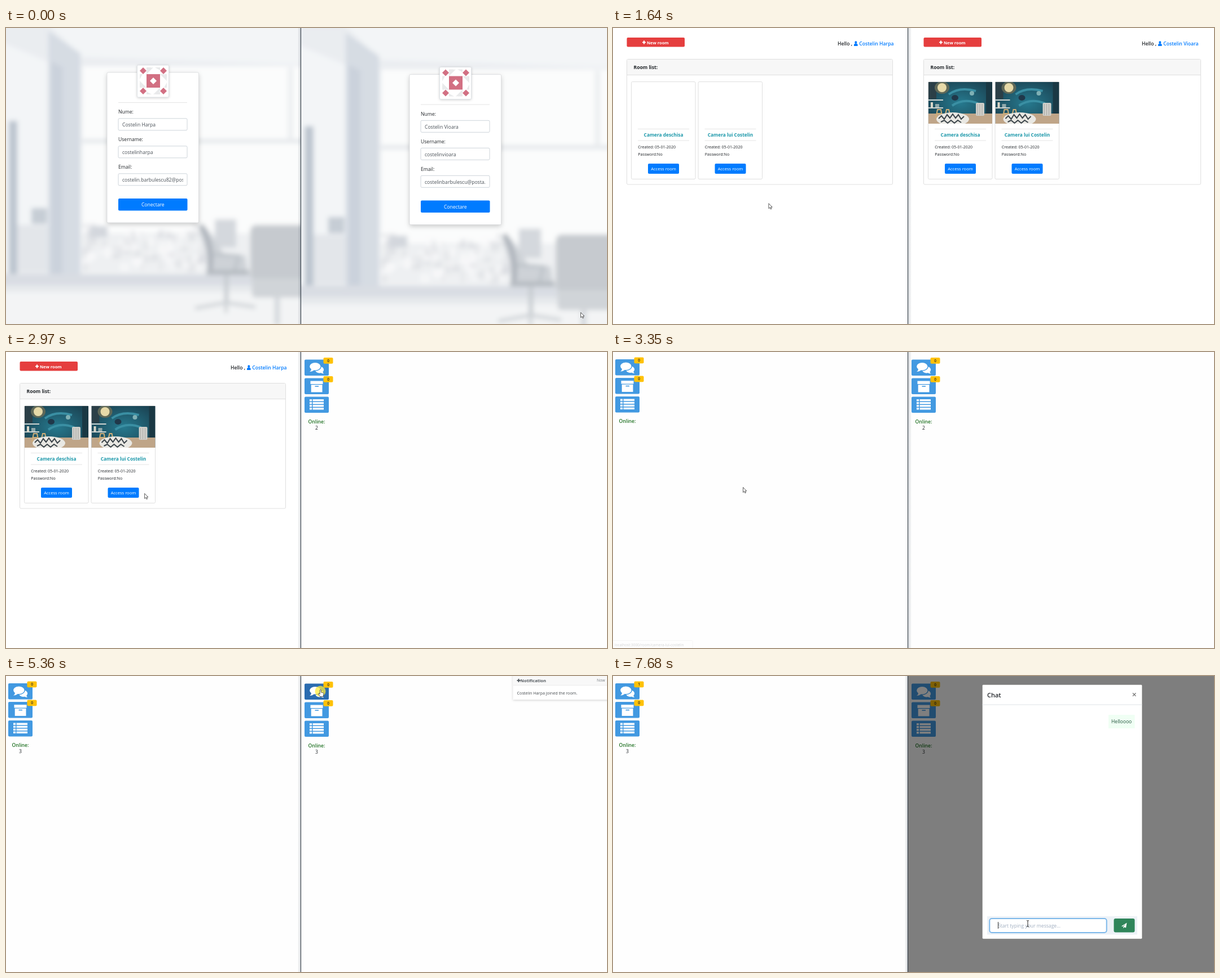
Animation of 1065 by 526 pixels, one loop 8000 ms. Source, as an HTML page:

```html
<!DOCTYPE html>
<html lang="ro">
<head>
<meta charset="utf-8">
<title>Chat rooms</title>
<style>
html, body { margin: 0; height: 100%; overflow: hidden; background: #fff; }
#stage { display: block; width: 100vw; height: 100vh; }
text { font: 8.6px "Open Sans", "Noto Sans", sans-serif; fill: #212529; }
.semi { font-weight: 600; }
.bold { font-weight: 700; }
.mid { text-anchor: middle; }
.end { text-anchor: end; }
.shadow { filter: drop-shadow(0 3px 4px rgba(0,0,0,.2)); }
.soft { filter: drop-shadow(0 1px 2px rgba(0,0,0,.18)); }
</style>
</head>
<body>
<svg id="stage" viewBox="0 0 1065 526"></svg>
<script>
const BLUE = '#007bff', LINE = '#dfdfdf';
const stage = document.getElementById('stage');
const $ = id => document.getElementById(id);

const rect = (x, y, w, h, fill, more = '') =>
  `<rect x="${x}" y="${y}" width="${w}" height="${h}" fill="${fill}" ${more}/>`;
const box = (x, y, w, h, fill, stroke = LINE) => rect(x, y, w, h, fill, `rx="2" stroke="${stroke}"`);
const path = (d, fill, more = '') => `<path d="${d}" fill="${fill}" ${more}/>`;
const stroke = (d, color, width = 1) => path(d, 'none', `stroke="${color}" stroke-width="${width}"`);
const ellipse = (x, y, rx, ry, fill, more = '') =>
  `<ellipse cx="${x}" cy="${y}" rx="${rx}" ry="${ry}" fill="${fill}" ${more}/>`;
const text = (x, y, s, { cls = '', size = 8.6, fill = '#212529', id = '' } = {}) =>
  `<text x="${x}" y="${y}" class="${cls}" id="${id}" style="font-size:${size}px;fill:${fill}">${s}</text>`;
const group = (id, body, more = '') => `<g id="${id}" ${more}>${body}</g>`;
const move = (x, y, body) => `<g transform="translate(${x} ${y})">${body}</g>`;
const plus = (x, y, fill) => stroke(`M${x - 3} ${y}h6M${x} ${y - 3}v6`, fill, 2);

function skyline() {
  let seed = 7, out = '';
  const rnd = () => (seed = (seed * 16807) % 2147483647) / 2147483647;
  for (let i = 0; i < 90; i++) {
    const x = 135 + rnd() * 215, y = 348 + rnd() * 70;
    out += rect(x, y, 4 + rnd() * 12, 5 + rnd() * 16, rnd() < .5 ? '#dadde1' : '#fafbfc', 'opacity=".6"');
  }
  return out;
}

// Blurred office interior behind the login form
const office = () => `<g filter="url(#blur)">` +
  rect(-20, -20, 580, 580, 'url(#haze)') +
  path('M-20 -20H560V66L135 52L60 -20z', '#f3f5f7') +
  path('M-20 20L75 60V435H-20z', '#f3f5f7') +
  rect(135, 68, 400, 370, '#fbfcfc') +
  rect(20, 350, 55, 85, '#e3e6ea') +
  rect(5, 165, 15, 285, '#bcc5cf') +
  path('M75 5L132 45V440L75 458z', '#d6dce3') + path('M80 60L100 70V450L80 456z', '#cbd2dc') +
  rect(135, 198, 400, 6, '#e0e4e8') + rect(500, 70, 8, 130, '#eaedef') +
  rect(135, 365, 400, 70, '#eef0f2') + skyline() +
  rect(45, 320, 28, 28, '#c6cdd5') + rect(150, 352, 30, 20, '#d3d7dd') + rect(370, 340, 38, 50, '#d4d8dd') +
  rect(-20, 437, 580, 20, '#d9dde3') + rect(-20, 457, 580, 12, '#e6e9ec') + rect(-20, 469, 580, 80, '#f3f4f5') +
  path('M340 350L356 356L385 400L424 404L428 436H358L354 400z', '#ced2d7') +
  stroke('M345 350Q368 385 361 430', '#aeb4bb', 9) + stroke('M366 402L412 405L405 432', '#bcc2c8', 5) +
  rect(355, 430, 76, 9, '#b6bbc1') + rect(387, 438, 7, 54, '#c5cacf') +
  stroke('M335 498L390 488L442 496M390 488V506', '#cfd3d7', 6) +
  rect(433, 350, 110, 97, '#c6cacf', 'rx="10"') + rect(436, 445, 104, 34, '#d0d4d8', 'rx="6"') +
  rect(476, 478, 9, 50, '#d3d7db') + '</g>';

function avatar() {
  let out = '';
  for (const a of [0, 90, 180, 270])
    out += `<g transform="rotate(${a} 261 94)">` + path('M243 70l6 6l-6 6l-6 -6z', '#d27083') +
      path('M249 70h9l-9 5zM273 70h-9l9 5zM249 82v-6q6 -6 12 -6z', '#e9eaeb') + '</g>';
  return box(232.5, 66, 56, 57, '#fff', '#dee2e6') + out + rect(249, 82, 24, 24, '#d27083') +
    path('M261 88l6 6l-6 6l-6 -6z', '#fff');
}

const login = (...values) =>
  rect(179, 79, 162.5, 267, '#fff', 'rx="2" class="shadow"') +
  rect(179, 79, 162.5, 267, 'none', 'rx="2" stroke="#d4d6d9" stroke-width=".7"') +
  `<g class="soft">${avatar()}</g>` + stroke('M199 132.5H321', '#e5e5e5') +
  ['Nume:', 'Username:', 'Email:'].map((label, i) => move(0, 49 * i,
    text(199, 152, label) + box(199, 160.8, 122, 21, '#fff', '#ced4da') +
    `<svg x="206" y="162" width="108" height="19">${text(0, 13, values[i], { fill: '#495057' })}</svg>`)).join('') +
  rect(199, 303, 122.5, 21.5, BLUE, 'rx="2"') +
  text(260.3, 317, 'Conectare', { cls: 'mid', fill: '#fff' });

// Flat stand-in for the playroom photo, 113 x 74
const photo = () => '<svg x="9" y="96" width="113" height="74">' +
  rect(0, 0, 113, 74, 'url(#space)') + '<g filter="url(#smooth)">' +
  stroke('M36 22Q55 8 84 16M42 42Q62 28 88 38', '#3a8fa3', 4) +
  rect(0, 0, 14, 30, '#2b3f47') + ellipse(24, 10, 13, 11, '#5f6858') + ellipse(24, 10, 8, 8, '#e6d9a8') +
  ellipse(47, 28, 6, 5, '#20384a') + ellipse(77, 20, 4, 4, '#7fb0b4') +
  rect(102, 0, 11, 56, '#1a3844') +
  rect(0, 56, 113, 18, '#bfa588') + rect(0, 31, 26, 2, '#cfd4d1') + rect(0, 45, 26, 2, '#cfd4d1') +
  rect(4, 36, 4, 9, '#d9d6c8') + rect(12, 39, 7, 6, '#8fa8ab') +
  stroke('M13 64L16 49H22L25 64M29 62L32 49H36L39 62M14 56H24', '#cfae78', 2) +
  rect(84, 37, 15, 23, '#d0cfca', 'rx="2"') + stroke('M87 39V59M91 39V59M95 39V59', '#a9a9a4') +
  ellipse(43, 66, 29, 12, '#e9e8e3') +
  stroke('M18 65l5 -5l5 6l5 -8l5 6l5 -7l5 7l5 -6l5 8l5 -5M22 71l6 -3l6 5l6 -5l6 5l6 -5l6 4', '#3b444a', 2) +
  '</g></svg>';

const roomCard = (x, title, id) => move(x, 0,
  box(8.5, 95.5, 113.5, 173, '#fff') + `<g class="${id}-photo">${photo()}</g>` +
  stroke('M20 179.5h91M20 200h91', '#e5e5e5') +
  text(65.5, 193.3, title, { cls: 'bold mid', size: 8.3, fill: '#1c98aa' }) +
  text(20.3, 213.5, 'Created: 05-01-2020', { size: 7.1 }) + text(20.3, 227, 'Password:No', { size: 7.1 }) +
  rect(38, 241, 55, 18, BLUE, `rx="2" class="${id}-access"`) +
  text(65.5, 253.3, 'Access room', { cls: 'mid', size: 7.6, fill: '#fff' }));

const roomList = (x, width, hello, name, id) => rect(0, 0, 1065, 526, '#fff') + move(x, 0,
  rect(.5, 17, 102.5, 16.5, '#e53e3e', 'rx="2"') + plus(31, 25.5, '#fff') +
  text(36, 28.5, 'New room', { cls: 'bold', size: 7.5, fill: '#fff' }) +
  box(.5, 55.5, width, 222.5, '#fff') + rect(1, 56, width - 1, 27, '#f7f7f7') +
  stroke(`M0 83.5h${width}`, LINE) + text(12.5, 73.2, 'Room list:', { cls: 'bold' }) +
  roomCard(0, 'Camera deschisa', id) + roomCard(118.5, 'Camera lui Costelin', id)) +
  move(hello, 0, text(0, 31, 'Hello ,', { cls: 'semi' }) + ellipse(32.3, 25.6, 2, 2.3, BLUE) +
    path('M29 32v-2q0 -2.5 3.3 -2.5t3.3 2.5v2z', BLUE) +
    text(38.3, 31, name, { cls: 'semi', fill: BLUE }));

const badge = (y, id) => rect(37.5, y, 17, 10.7, '#ffc107', 'rx="2"') +
  text(46, y + 7.8, '0', { cls: 'mid semi', size: 6.5, id });
const bubble = 'stroke="currentColor" stroke-width="1.3"';

const room = id => rect(0, 0, 600, 526, '#fefefe') +
  group(id + 'Chat', rect(4, 13, 43, 28.5, 'currentColor', 'rx="2"') +
    ellipse(30.5, 31, 7.6, 6, '#fff') + path('M32 36q3 2 6 2q-2 -2 -2 -5z', '#fff') +
    ellipse(22.8, 25.3, 10.3, 7.4, '#fff', bubble) + path('M16 29q0 4 -3 5.5q5 0 8 -3z', '#fff')) +
  rect(4, 46, 43, 28.5, '#4299e1', 'rx="2"') + rect(14.5, 51, 22, 5.5, '#fff') +
  rect(15.7, 57.7, 19.8, 13.2, '#fff') + stroke('M22.5 60.5h6.5', '#4299e1', 1.6) +
  rect(4, 79, 43, 28.5, '#4299e1', 'rx="2"') +
  [0, 1, 2, 3].map(i => stroke(`M13 ${85.3 + 5 * i}h4M18.5 ${85.3 + 5 * i}h19.5`, '#fff', 3.4)).join('') +
  badge(9.5, id + 'Unread') + badge(42.5, id + 'Files') +
  text(25.5, 126, 'Online:', { cls: 'mid semi', fill: '#1d7020' }) +
  text(25.5, 137, '', { cls: 'mid', id: id + 'Online' });

const toast = rect(898.5, -4, 170, 46, '#fff', 'class="soft"') + rect(898.5, -4, 170, 20, '#f8f8f8') +
  stroke('M898.5 16.5H1065', '#ececec') + plus(908.5, 8, '#555b60') +
  text(911.5, 11, 'Notification', { cls: 'bold', size: 7.6, fill: '#555b60' }) +
  text(1061.5, 10.3, 'Now', { cls: 'end', size: 6.8, fill: '#7c8287' }) +
  text(905.5, 32.7, 'Costelin Harpa joined the room.', { size: 7.2, fill: '#43484c' });

const modal = rect(654.3, 15.3, 283.5, 452, '#fff', 'rx="2" stroke="#6c6c6a" stroke-width=".6"') +
  text(663, 37.6, 'Chat', { cls: 'semi', size: 11 }) + stroke('M654.5 51H937.5', '#dee2e6') +
  stroke('M921 30.3l5.5 5.5m0 -5.5l-5.5 5.5', '#777', 1.3) +
  rect(663, 427, 266, 32.5, '#edf2f7') +
  rect(667.3, 431, 207.4, 25, '#fff', 'rx="4"') +
  group('focus', rect(667.3, 431, 207.4, 25, 'none', 'rx="4" stroke="#7db8ea" stroke-width="2"')) +
  text(682, 446.7, '', { id: 'draft' }) + rect(682, 437, 1, 12, '#333', 'id="caret"') +
  rect(887.5, 431, 37, 24.5, '#2f855a', 'rx="3"') +
  path('M901 444.5L910.5 438.5L909 447.5L906 446.3L904.3 448.5V445.6L908.5 440.5L903 445.2z', '#fff') +
  group('message', rect(878, 69, 46.5, 24, '#f0fff4') + text(883, 84.3, 'Helloooo', { fill: '#22543d' }));

const ink = 'stroke="#333" stroke-width=".8"';
const cursor = ellipse(0, 3, 9.5, 9.5, '#ffeb3b', 'opacity=".75" id="click"') +
  group('arrow', path('M.5 .5V9.5L2.6 7.6L4 10.7L5.5 10L4.1 7H6.8z', '#fff', ink)) +
  group('hand', path('M-.8 1Q.3 -.4 1.4 1V5L5 5.8Q6 6.2 6 7.5L5 12.5H-.5L-3.5 8Q-3.2 6.5 -1.8 7.5L-.8 8.3z', '#fff', ink)) +
  group('beam', stroke('M-2 -5.5Q0 -5.5 0 -4.5Q0 -5.5 2 -5.5M0 -4.5V4.5M-2 5.5Q0 5.5 0 4.5Q0 5.5 2 5.5', '#222'));

stage.innerHTML = `<defs>
  <filter id="blur" x="-5%" y="-5%" width="110%" height="110%"><feGaussianBlur stdDeviation="4.2"/></filter>
  <filter id="smooth"><feGaussianBlur stdDeviation=".6"/></filter>
  <linearGradient id="haze" x2="0" y2="1"><stop stop-color="#e9ecf0"/><stop offset="1" stop-color="#f3f4f5"/></linearGradient>
  <radialGradient id="space" r=".6"><stop stop-color="#267a8f"/><stop offset="1" stop-color="#1b4454"/></radialGradient>
  <linearGradient id="shade"><stop stop-color="#203040" stop-opacity="0"/><stop offset="1" stop-color="#203040" stop-opacity=".2"/></linearGradient>
  </defs>
  <svg width="522" height="526">` +
  group('left0', office() + login('Costelin Harpa', 'costelinharpa', 'costelin.barbulescu82@posta.test')) +
  group('left1', roomList(24, 471, 398, 'Costelin Harpa', 'left')) +
  group('left2', room('left')) +
  group('status', box(-1, 512.5, 142, 15, '#fff', '#ddd') +
    text(3, 523, 'localhost:3000/room/camera-lui-costelin', { size: 6.5, fill: '#5f6368' })) +
  `</svg><svg x="523" width="542" height="526" viewBox="523 0 542 526">` +
  group('right0', `<g transform="translate(524 3) scale(1.04)">${office()}</g>` +
    move(536, 3.5, login('Costelin Vioara', 'costelinvioara', 'costelinbarbulescu@posta.test'))) +
  group('right1', roomList(550, 491, 937, 'Costelin Vioara', 'right')) +
  group('right2', rect(523, 0, 542, 526, '#fefefe') + move(525, .5, room('right'))) +
  group('toast', toast) + rect(523, 0, 542, 526, '#000', 'id="backdrop"') + group('modal', modal) + '</svg>' +
  rect(517, 0, 5, 526, 'url(#shade)', 'id="shadeLeft"') +
  rect(-529, 0, 6, 526, 'url(#shade)', 'id="shadeRight" transform="scale(-1 1)"') +
  rect(522, 0, 1, 526, '#2a343e') + group('cursor', cursor);

const STEP = 77.5, LOOP = 8000;
const ROUTE = [[0, 1018, 505], [5, 810, 316], [7, 810, 316], [10, 618, 291], [11, 480, 288], [17, 262, 313],
  [20, 262, 313], [30, 741, 252], [32, 741, 252], [33, 709, 250], [39, 208, 251], [41, 208, 251], [43, 230, 240],
  [46, 340, 197], [50, 340, 197], [60, 1030, 24], [61, 1030, 24], [67, 557, 24], [70, 557, 24],
  [72, 700, 474], [76, 735, 440], [110, 735, 440]];
const HOVERS = [[5, 7], [17, 19], [30, 32], [39, 41], [67, 70]];
const CLICKS = [6, 18, 32, 40, 69, 76];
const KEYS = [86, 88, 90, 92, 92, 94, 95, 97];
const SENT = 99;

const clamp = v => Math.max(0, Math.min(1, v));
const fade = (id, v) => { $(id).style.opacity = v; };
const show = (id, on) => { $(id).style.display = on ? '' : 'none'; };
const paint = (node, color) => { node.style.fill = color; };
const within = (k, a, b) => k >= a && k <= b;

function pointer(k) {
  const i = ROUTE.findIndex(p => p[0] > k);
  const [a, x, y] = ROUTE[i - 1], [b, x2, y2] = ROUTE[i];
  const u = (k - a) / (b - a), e = u * u * (3 - 2 * u);
  return [x + (x2 - x) * e, y + (y2 - y) * e];
}

function drawPages(k) {
  const left = k < 20 ? 0 : k < 41 ? 1 : 2;
  const right = k < 8 ? 0 : k < 32 ? 1 : 2;
  for (let i = 0; i < 3; i++) {
    show('left' + i, left === i);
    show('right' + i, right === i);
  }
  for (const node of document.querySelectorAll('.left-photo')) node.style.opacity = k < 22 ? 0 : 1;
  paint(document.querySelectorAll('.right-access')[1], k >= 30 ? '#0069d9' : BLUE);
  paint(document.querySelectorAll('.left-access')[1], k >= 39 ? '#0069d9' : BLUE);
  $('leftChat').style.color = '#4299e1';
  $('rightChat').style.color = within(k, 67, 70) ? '#2b6cb0' : '#4299e1';
  $('leftOnline').textContent = k < 44 ? '' : 3;
  $('rightOnline').textContent = k < 34 ? '' : k < 44 ? 2 : 3;
  $('leftUnread').textContent = k < SENT ? 0 : 1;
  fade('status', k < 39 || k > 43 ? 0 : k === 43 ? .25 : 1);
  const leftFocus = within(k, 18, 30) || within(k, 40, 68);
  show('shadeLeft', !leftFocus);
  show('shadeRight', leftFocus);
}

function drawChat(k) {
  const open = clamp((k - 69) / 3);
  fade('toast', k < 84 ? clamp((k - 43) / 3) : clamp((86 - k) / 3));
  fade('backdrop', .5 * clamp((k - 69) / 2));
  fade('modal', open);
  $('modal').setAttribute('transform', `translate(0 ${-30 * (1 - open)})`);
  const typed = k < SENT ? 'Helloooo'.slice(0, KEYS.filter(t => t <= k).length) : '';
  const draft = $('draft');
  draft.textContent = typed || 'Start typing your message...';
  paint(draft, typed ? '#4a5568' : '#a0aec0');
  $('caret').setAttribute('x', 682 + (typed ? draft.getComputedTextLength() : 0));
  show('caret', k >= 77 && !within(k, 84, 85));
  show('focus', k >= 77);
  show('message', k >= SENT);
}

function drawCursor(k) {
  const hand = HOVERS.some(([a, b]) => within(k, a, b)), beam = k >= 75;
  $('cursor').setAttribute('transform', `translate(${pointer(k)})`);
  show('hand', hand);
  show('beam', beam);
  show('arrow', !hand && !beam);
  show('click', CLICKS.includes(k));
}

let last = -1;
function frame() {
  const k = Math.floor((performance.now() % LOOP + 8) / STEP);
  if (k !== last) {
    drawPages(k);
    drawChat(k);
    drawCursor(k);
    last = k;
  }
  requestAnimationFrame(frame);
}
frame();
</script>
</body>
</html>
```
